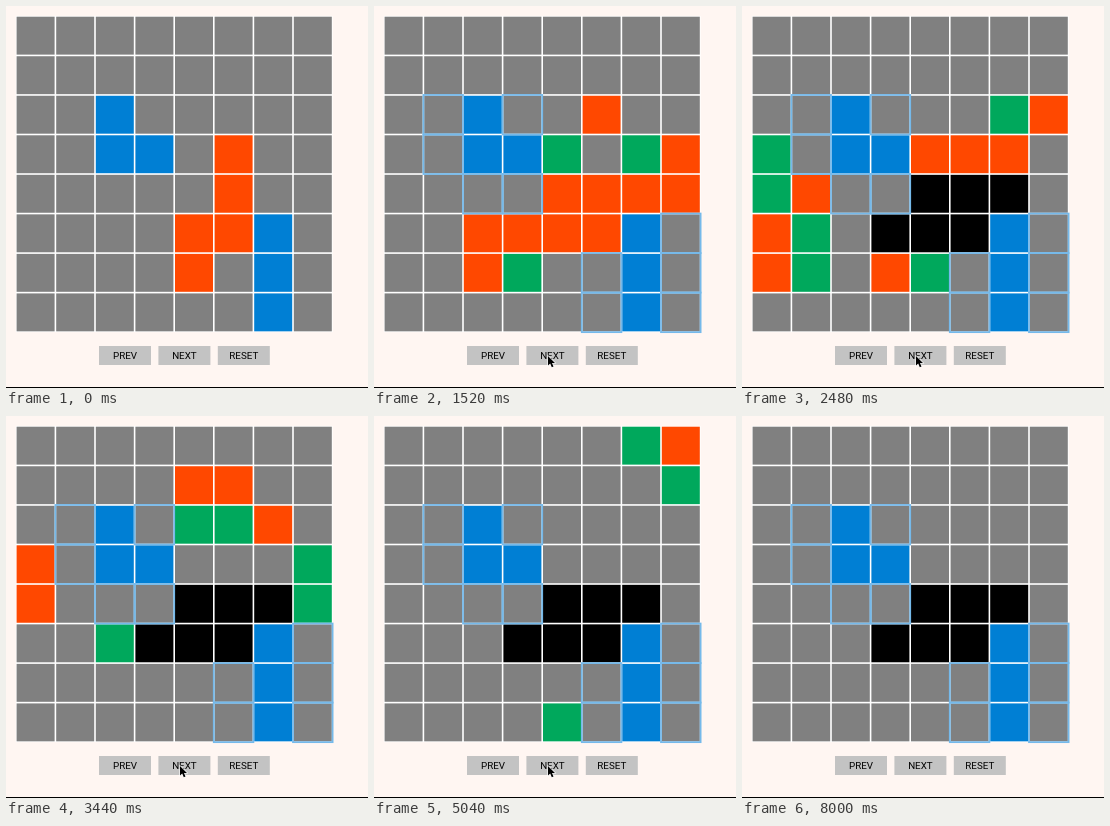
Recreate the animation shown at these times as an HTML page with a canvas. Size 362 px wide and 382 px high, loop 8.32 s.

```html
<!DOCTYPE html>
<html lang="en">
<head>
<meta charset="utf-8">
<style>
  html, body { margin: 0; height: 100%; overflow: hidden; background: #fff6f2; }
  canvas { display: block; }
</style>
</head>
<body>
<canvas width="362" height="382"></canvas>
<script>
const ctx = document.querySelector('canvas').getContext('2d');
const LOOP = 8320, SIZE = 8, PITCH_X = 39.6, PITCH_Y = 39.53, LEFT = 9.8, TOP = 9.9;
const COLORS = { off: '#808080', on: '#ff4800', dying: '#00a85c', wall: '#007fd4', stone: '#000' };
const CLICKS = [1040, 1520, 2000, 2480, 2960, 3440, 3920, 4400, 4960, 5600, 6480];

// Cursor path: time, x, y of the tip
const CURSOR = [[400, 283, 383], [880, 174, 350], [7280, 174, 350], [7760, 326, 383]];

function neighbours(grid, index, state) {
  const row = Math.floor(index / SIZE), col = index % SIZE;
  let count = 0;
  for (let dy = -1; dy <= 1; dy++) {
    for (let dx = -1; dx <= 1; dx++) {
      if (!dx && !dy) continue;
      const y = (row + dy + SIZE) % SIZE, x = (col + dx + SIZE) % SIZE;
      if (grid[y * SIZE + x].state === state) count++;
    }
  }
  return count;
}

function firstGrid() {
  const grid = Array.from({ length: SIZE * SIZE }, () => ({ state: 'off', age: 0 }));
  const place = (state, cells) => cells.forEach(([row, col]) => grid[row * SIZE + col].state = state);
  place('wall', [[2, 2], [3, 2], [3, 3], [5, 6], [6, 6], [7, 6]]);
  place('on', [[3, 5], [4, 5], [5, 4], [5, 5], [6, 4]]);
  return grid;
}

const start = firstGrid();
const guarded = start.map((cell, i) => cell.state === 'off' && neighbours(start, i, 'wall') >= 2);

// A cell that has been on for three generations turns to stone, which no longer counts as live.
function nextCell(cell, i, grid) {
  const live = neighbours(grid, i, 'on');
  if (cell.state === 'on') {
    if (cell.age === 2) return { state: 'stone', age: 0 };
    return live >= 3 ? { state: 'on', age: cell.age + 1 } : { state: 'dying', age: 0 };
  }
  if (cell.state === 'dying') return { state: 'off', age: 0 };
  if (cell.state === 'off' && !guarded[i] && live >= 2) return { state: 'on', age: 0 };
  return cell;
}

const history = [start];
for (const _ of CLICKS) history.push(history[history.length - 1].map(nextCell));

function drawGrid(step) {
  ctx.fillStyle = '#fff';
  ctx.fillRect(LEFT, TOP, PITCH_X * SIZE, PITCH_Y * SIZE);
  const corner = i => [LEFT + (i % SIZE) * PITCH_X, TOP + Math.floor(i / SIZE) * PITCH_Y];
  history[step].forEach((cell, i) => {
    const [x, y] = corner(i);
    ctx.fillStyle = COLORS[cell.state];
    ctx.fillRect(x + 0.8, y + 0.8, PITCH_X - 1.6, PITCH_Y - 1.6);
  });
  if (step === 0) return;
  ctx.strokeStyle = '#75b9ea';
  ctx.lineWidth = 1.8;
  guarded.forEach((on, i) => {
    if (on) ctx.strokeRect(...corner(i), PITCH_X, PITCH_Y);
  });
}

function drawButton(label, x) {
  ctx.fillStyle = '#c3c3c3';
  ctx.fillRect(x, 340, 52, 19);
  ctx.fillStyle = '#000';
  ctx.font = '9.8px Roboto, sans-serif';
  ctx.textAlign = 'center';
  ctx.fillText(label, x + 26, 353);
}

function drawCursor(time) {
  const next = CURSOR.findIndex(([at]) => at > time);
  if (next < 1) return;
  const [t0, x0, y0] = CURSOR[next - 1], [t1, x1, y1] = CURSOR[next];
  const p = (time - t0) / (t1 - t0), ease = p * p * (3 - 2 * p);
  ctx.save();
  ctx.translate(x0 + (x1 - x0) * ease, y0 + (y1 - y0) * ease);
  const arrow = new Path2D('M0 0V9.6L2.2 7.6L3.8 11.2L5.5 10.4L4 7H7Z');
  ctx.strokeStyle = '#fff';
  ctx.lineWidth = 1.2;
  ctx.stroke(arrow);
  ctx.fillStyle = '#000';
  ctx.fill(arrow);
  ctx.restore();
}

function draw(now) {
  const time = now % LOOP;
  ctx.fillStyle = '#fff6f2';
  ctx.fillRect(0, 0, 362, 382);
  drawGrid(CLICKS.filter(at => at <= time).length);
  drawButton('PREV', 93);
  drawButton('NEXT', 152.4);
  drawButton('RESET', 211.8);
  drawCursor(time);
  ctx.fillStyle = '#000';
  ctx.fillRect(0, 381, 362, 1);
}

const began = performance.now();
function tick() {
  draw(performance.now() - began);
  requestAnimationFrame(tick);
}
tick();
</script>
</body>
</html>
```
